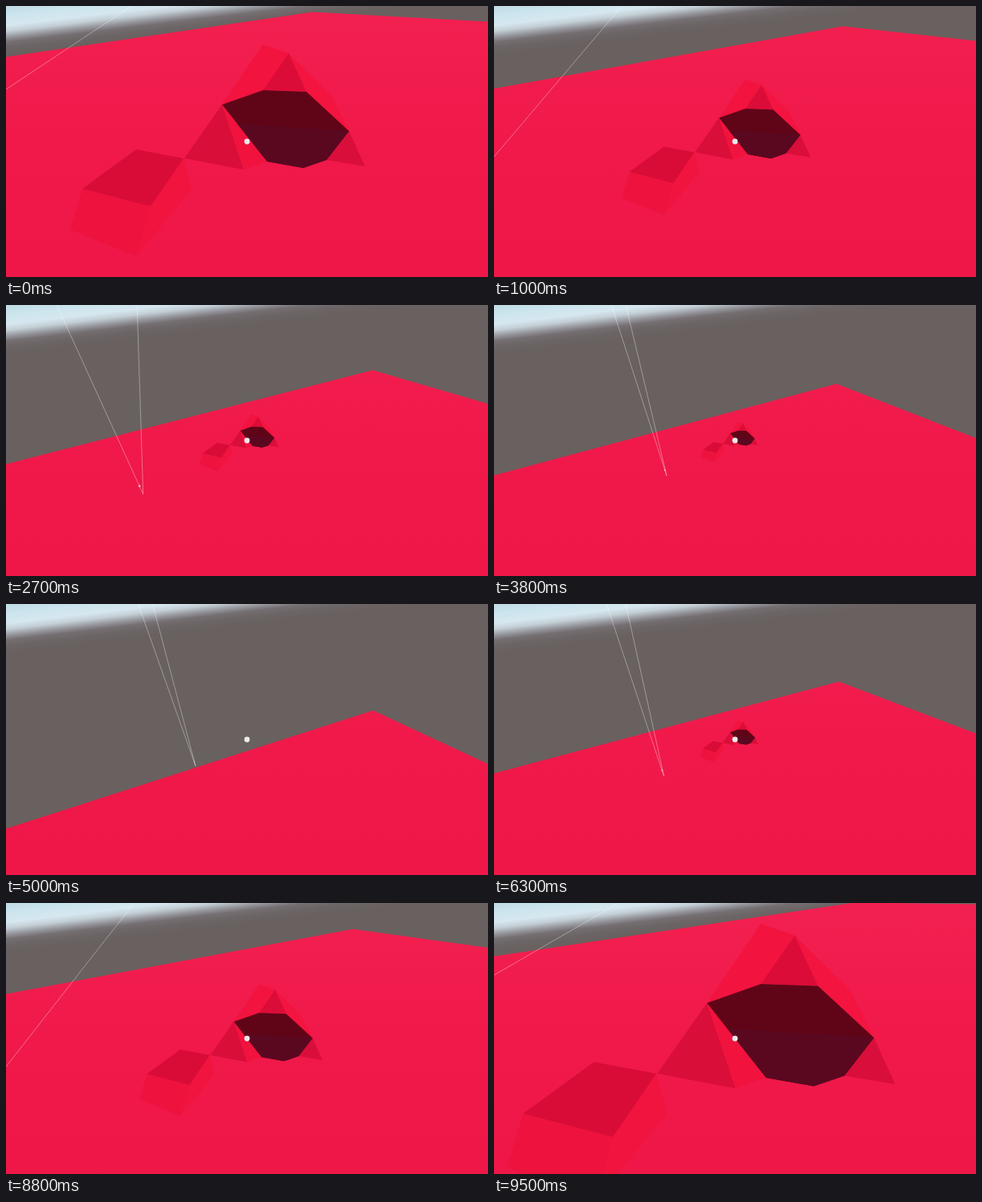
These frames come from a looping animation (600x338 px, 9900 ms). An HTML page with a canvas:

```html
<!DOCTYPE html>
<html>
<head>
<meta charset="utf-8">
<style>
html, body { margin: 0; width: 100%; height: 100%; overflow: hidden; background: #69615f; }
canvas { display: block; width: 600px; height: 338px; }
</style>
</head>
<body>
<canvas id="stage" width="600" height="338"></canvas>
<script>
const ctx = document.getElementById('stage').getContext('2d');
const LOOP = 9900, STEP = 100;
const CX = 300, CY = 169, FOCAL = 292.7;

// Camera path: time, distance to the pole, ground drop, mound distance, mound shift
const path = [
  [0, .138, 46, 1, 0], [500, .138, 46, 1, 0], [1500, .84, 40, 2.12, 0],
  [1700, 1, 40, 2.39, 0], [2500, 1.73, 40, 3.46, 0], [3800, 2.906, 40, 5.18, 0],
  [4800, 3.86, 40, 6.7, 0], [5100, 3.86, 40, 6.7, 0], [7400, 1.816, 40, 3.59, 0],
  [8100, 1.09, 55, 2.43, .5], [8800, .54, 78, 1.61, 1], [9500, .06, 78, .76, 1],
  [9900, .06, 78, .76, 1]
];

// World axes in camera space, and their vanishing points on the stage
const across = [.9234, -.2714, .2714];
const away = [-.3735, -.473, .798];
const down = [.0882, .8382, .5381];
const vanishAcross = [1230, -117];
const vanishAway = [163, -4.5];
const vanishDown = [348, 625];

const CHUNK = 1.31;
const unloadAt = [3.52, 1.9, .29];

const faces = [
  ['#ee133f', 95,228, 180,250, 162,312, 80,279],
  ['#f0143f', 221,190, 231,228, 162,312, 180,250],
  ['#d90c37', 162,179, 221,190, 180,250, 95,228],
  ['#f2133f', 320,48, 352,59, 320,105, 269,123],
  ['#f3143f', 352,59, 405,112, 427,156, 374,107],
  ['#dc0c38', 352,59, 374,107, 320,105],
  ['#da0e3a', 427,156, 447,200, 399,192],
  ['#d90e39', 269,123, 296,204, 222,190],
  ['#f2123e', 269,123, 325,194, 296,204],
  ['#600517', 269,123, 320,105, 374,107, 427,156, 399,192, 370,202, 325,194],
  ['#5a0820', 288,147, 345,151, 427,156, 399,192, 370,202, 325,194]
];

const sky = ctx.createLinearGradient(0, 0, 7.2, 60);
[[0, '#bfdce4'], [.22, '#cde5ee'], [.4, '#d6e7ef'], [.52, '#c3ced5'],
 [.64, '#96979d'], [.74, '#756f72'], [.86, '#6c6566'], [1, '#69615f']]
  .forEach(([at, color]) => sky.addColorStop(at, color));

const soil = ctx.createLinearGradient(0, 0, 0, 338);
soil.addColorStop(0, '#f22050');
soil.addColorStop(.5, '#f0194a');
soil.addColorStop(1, '#ee1747');

function cameraAt(t) {
  const i = Math.max(1, path.findIndex(key => key[0] >= t));
  const from = path[i - 1], to = path[i];
  const k = (t - from[0]) / (to[0] - from[0]);
  return from.slice(1).map((v, n) => v + (to[n + 1] - v) * k);
}

const project = ([x, y, z]) => [CX + FOCAL * x / z, CY + FOCAL * y / z];
const move = (p, axis, amount) => p.map((v, i) => v + axis[i] * amount);
const extend = (p, from, k) => [p[0] + (p[0] - from[0]) * k, p[1] + (p[1] - from[1]) * k];

function polygon(points, fill) {
  ctx.beginPath();
  points.forEach(p => ctx.lineTo(...p));
  ctx.fillStyle = fill;
  ctx.fill();
}

function disc(x, y, r, fill) {
  ctx.beginPath();
  ctx.arc(x, y, r, 0, Math.PI * 2);
  ctx.fillStyle = fill;
  ctx.fill();
}

function wire(a, b) {
  ctx.beginPath();
  ctx.moveTo(...a);
  ctx.lineTo(...b);
  ctx.strokeStyle = 'rgba(255,255,255,.45)';
  ctx.lineWidth = .8;
  ctx.stroke();
}

function drawGround(foot, drop, rows) {
  const columns = foot[2] < .1 ? 5.2 : 3.91;
  let corner = move(foot, across, columns);
  corner = move(corner, away, .14 + CHUNK * rows);
  corner = project(move(corner, down, drop / 544));
  polygon([corner, extend(corner, vanishAcross, 3), [-2000, 2000],
    [3000, 2000], extend(corner, vanishAway, 6)], soil);
}

function drawMound(distance, shift) {
  const scale = 1 / distance;
  const place = (x, y) => [
    CX + (x - CX + 4.5 * shift) * scale,
    CY + (y - CY + 12.3 * shift) * scale
  ];
  for (const [fill, ...xy] of faces) {
    const points = [];
    for (let i = 0; i < xy.length; i += 2) points.push(place(xy[i], xy[i + 1]));
    polygon(points, fill);
  }
}

function drawPole(foot) {
  const base = project(foot);
  wire(base, vanishAway);
  wire(base, extend(base, vanishDown, 2));
  const knob = move(foot, down, -.09);
  if (knob[2] > .3) {
    const [x, y] = project(knob);
    const r = 2.7 / foot[2];
    disc(x, y, r, 'rgba(235,215,215,.75)');
    disc(x, y, r * .5, '#f4f0ec');
  }
}

function draw(t) {
  const [depth, drop, distance, shift] = cameraAt(t);
  const foot = [-.844, .437, depth];
  const rows = unloadAt.filter(limit => depth < limit).length;
  ctx.fillStyle = sky;
  ctx.fillRect(0, 0, 600, 338);
  drawGround(foot, drop, rows);
  if (rows) drawMound(distance, shift);
  drawPole(foot);
  disc(CX, CY, 3.4, '#f0e9ea');
}

const start = performance.now();
function frame() {
  const t = (performance.now() - start) % LOOP;
  draw(Math.floor(t / STEP) * STEP);
  requestAnimationFrame(frame);
}
frame();
</script>
</body>
</html>
```
